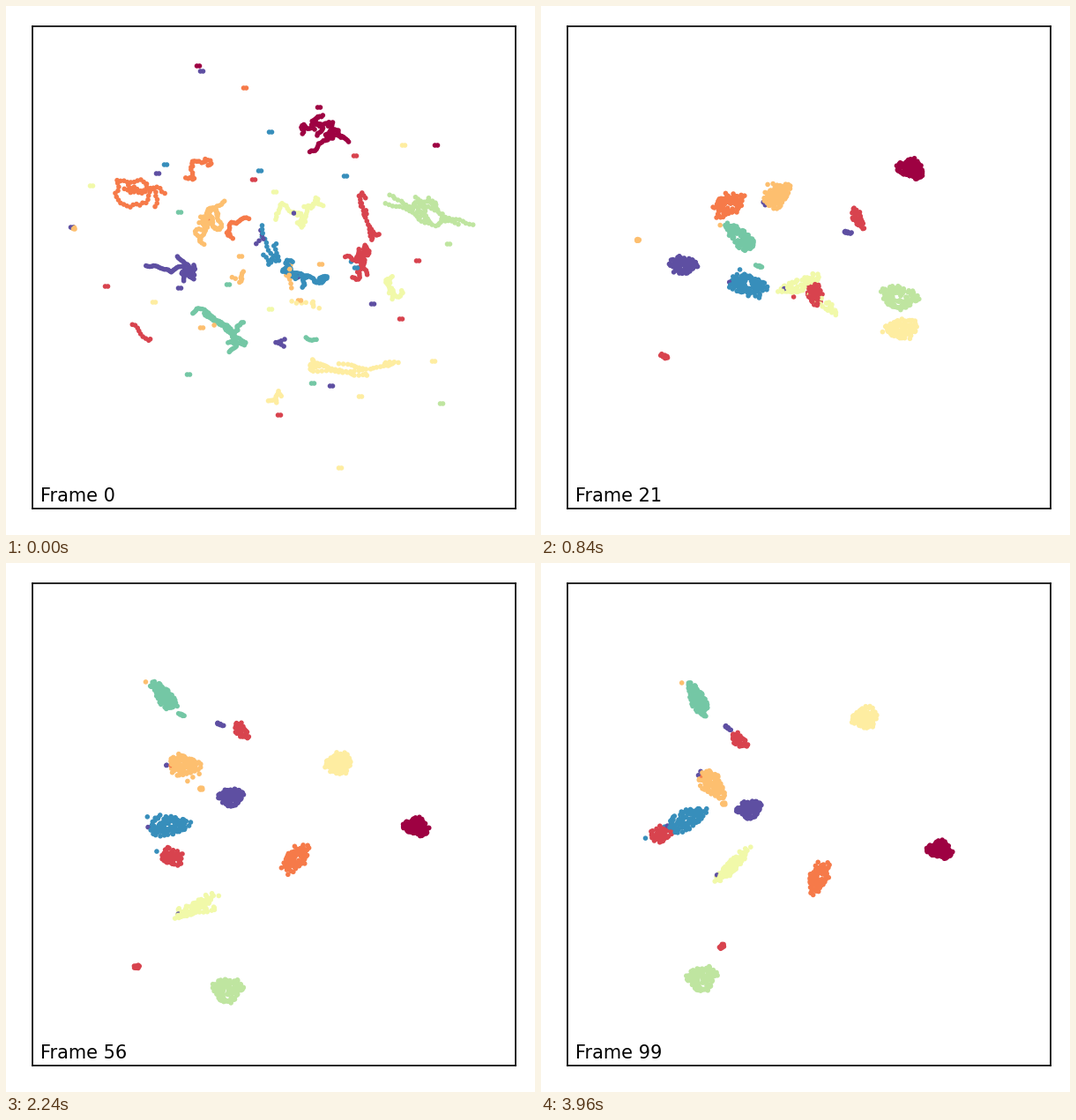
Recreate the animation shown at these times as a matplotlib script. Size 600 px wide and 600 px high, loop 4 s.

```python
import matplotlib.pyplot as plt
import numpy as np
from matplotlib.animation import FuncAnimation

FRAMES, INTERVAL = 100, 40
KEYS = np.array([0, 13, 30, 40, 56, 73, 99])
CENTER = np.array([304, 296])

rng = np.random.default_rng(11)
mains = {}
tracks, labels, pushes = [], [], []


def filaments(n):
    """Branching random walk, scaled to the unit box along its main axes."""
    pts, heading, here = [np.zeros(2)], rng.uniform(0, 6.28), 0
    while len(pts) < n:
        if rng.random() < 0.12:
            here, heading = rng.integers(len(pts)), rng.uniform(0, 6.28)
        heading += rng.normal(0, 0.6)
        pts.append(pts[here] + [np.cos(heading), np.sin(heading)])
        here = len(pts) - 1
    pts = np.array(pts) - np.mean(pts, axis=0)
    axes = np.linalg.eigh(pts.T @ pts)[1][:, ::-1]
    pts = pts @ axes
    pts -= (pts.max(axis=0) + pts.min(axis=0)) / 2
    return pts / np.maximum(np.abs(pts).max(axis=0), 1e-6)


def blob(walk):
    """Bumpy disc that keeps every point on its own side of the walk."""
    n = len(walk)
    rank = np.argsort(np.argsort(np.arctan2(walk[:, 1], walk[:, 0])))
    angle = 2 * np.pi * rank / n - np.pi
    radius = np.sqrt(rng.random(n)) * (1 + 0.15 * np.sin(3 * angle + rng.uniform(0, 6)))
    return np.column_stack([np.cos(angle), np.sin(angle)]) * radius[:, None]


def add(label, n, first, last, path, push=0.06):
    """Points that turn from filaments into a blob; shapes are (long, short, tilt)."""
    first, last = np.array(first), np.array(last)
    walk = filaments(n)
    disc = blob(walk)
    poses = []
    for key, center in zip(KEYS, path):
        mix = 1 - np.exp(-key / 12)
        size = first[:2] + (last - first)[:2] * mix
        tilt = np.radians(first[2] + (last - first)[2] * key / KEYS[-1])
        turn = np.array([[np.cos(tilt), np.sin(tilt)], [-np.sin(tilt), np.cos(tilt)]])
        poses.append(center + ((walk + (disc - walk) * mix) * size) @ turn)
    tracks.append(np.array(poses))
    labels.extend([label] * n)
    pushes.extend([push] * n)


def cluster(label, n, first, last, *path):
    path = np.array(path, float)
    mains.setdefault(label, (last, path, first))
    add(label, n, first, last, path)


def joiner(label, n, home, shape=(1.5, 0.5, 0), lag=4, push=0.06):
    """A loose piece that is pulled into the main cluster of its class."""
    last, path, _ = mains[label]
    pull = np.exp(-KEYS / lag)[:, None]
    add(label, n, shape, last, path + (home - path[0]) * pull, push)


def strays(label, *homes):
    for home in homes:
        joiner(label, 2, home, lag=rng.uniform(4, 8), push=0.2)


# main clusters
cluster(0, 130, (28, 22, 20), (14, 10, 10), (361, 148), (396, 163), (446, 216),
        (466, 259), (465, 299), (452, 322), (452, 325))
cluster(1, 60, (20, 14, 100), (13, 9, -25), (398, 290), (339, 318), (277, 335),
        (225, 334), (188, 333), (147, 326), (136, 307))
cluster(2, 62, (28, 16, 5), (19, 10, -65), (152, 213), (182, 200), (253, 263),
        (299, 308), (328, 335), (331, 349), (314, 357))
cluster(3, 95, (27, 13, -60), (18, 11, 50), (233, 244), (268, 222), (260, 212),
        (230, 221), (202, 230), (197, 245), (194, 251))
cluster(4, 75, (50, 9, 0), (15, 12, -10), (395, 410), (412, 405), (401, 313),
        (388, 260), (377, 227), (366, 203), (367, 175))
cluster(5, 60, (28, 16, -15), (27, 6, -45), (333, 235), (321, 275), (259, 363),
        (224, 392), (215, 390), (215, 370), (217, 343))
cluster(6, 110, (51, 14, 18), (17, 14, -10), (481, 233), (447, 280), (356, 391),
        (311, 450), (251, 484), (213, 497), (182, 471))
cluster(7, 95, (34, 18, 40), (19, 8, 65), (245, 362), (240, 316), (207, 199),
        (193, 159), (179, 151), (167, 153), (177, 154))
cluster(8, 75, (25, 12, 20), (24, 11, -25), (338, 307), (276, 308), (190, 322),
        (174, 306), (184, 298), (175, 296), (165, 291))
cluster(9, 85, (28, 13, 10), (14, 10, -10), (187, 296), (153, 301), (179, 281),
        (222, 272), (255, 265), (246, 280), (236, 279))

# small clusters that stay apart
cluster(1, 36, (27, 5, 72), (11, 6, 45), (411, 238), (374, 262), (343, 212),
        (310, 202), (267, 190), (236, 200), (225, 201))
cluster(1, 9, (13, 2, 45), (4, 2, -40), (153, 370), (130, 373), (153, 428),
        (151, 449), (148, 458), (137, 472), (205, 435))
cluster(9, 8, (5, 4, 0), (5, 1, 35), (311, 382), (362, 306), (320, 206),
        (287, 185), (243, 183), (214, 189), (212, 187))
cluster(7, 6, (6, 1, 10), (4, 1, 30), (346, 378), (239, 376), (265, 198),
        (230, 174), (199, 172), (184, 176), (184, 172))
cluster(3, 5, (1, 1, 0), (3, 2, 0), (77, 252), (103, 276), (123, 250),
        (178, 250), (221, 256), (220, 265), (207, 273))

# loose pieces
joiner(2, 24, (216, 183), (17, 8, -40))
joiner(2, 20, (262, 249), (15, 7, -45))
joiner(3, 9, (265, 307), (7, 5, -40))
joiner(3, 9, (321, 307), (13, 3, 85))
joiner(4, 14, (306, 445), (8, 4, -45))
joiner(4, 9, (340, 337), (16, 3, 10))
joiner(5, 26, (439, 320), (12, 7, 60), lag=15)
joiner(8, 25, (297, 270), (22, 9, 70))
joiner(9, 5, (289, 263), (8, 3, -70))

strays(0, (355, 115), (218, 68), (488, 158))
strays(1, (281, 197), (396, 170), (467, 289), (448, 355), (114, 318), (310, 464))
strays(2, (271, 93))
strays(3, (357, 293), (333, 334), (222, 365), (266, 284))
strays(4, (402, 443), (485, 403), (379, 524), (451, 158), (168, 336))
strays(5, (305, 211), (300, 344), (97, 204))
strays(6, (494, 451), (502, 270))
strays(7, (207, 418), (197, 234), (348, 428), (252, 316))
strays(8, (300, 143), (288, 187), (181, 180), (385, 193), (397, 297))
strays(9, (222, 74), (75, 251), (172, 190), (197, 320), (369, 431), (416, 338))

# single points that live inside another class
for label, host in ((9, 3), (9, 3), (9, 5), (9, 8), (8, 1), (3, 7), (2, 3)):
    last, path, first = mains[host]
    spot = blob(rng.normal(size=(1, 2)))[0]
    add(label, 1, first, last, path + spot * [8, 6])

order = rng.permutation(len(labels))
spots = np.concatenate(tracks, axis=1)[:, order]
push = np.array(pushes)[order][:, None]
colors = plt.cm.Spectral(np.array(labels)[order] / 9)
slopes = 0.6 * np.gradient(spots, KEYS, axis=0)


def positions(frame):
    k = min(np.searchsorted(KEYS, frame, side="right") - 1, len(KEYS) - 2)
    span = KEYS[k + 1] - KEYS[k]
    t = (frame - KEYS[k]) / span
    ease = t * t * (3 - 2 * t)
    xy = (spots[k] * (1 - ease) + spots[k + 1] * ease
          + span * t * (1 - t) * ((1 - t) * slopes[k] - t * slopes[k + 1]))
    # early repulsion flings loose points outwards
    burst = frame / 3 * np.exp(1 - frame / 3) * max(0, 1 - frame / 13)
    return xy + (xy - CENTER) * push * burst


fig = plt.figure(figsize=(6, 6), dpi=100, facecolor="white")
ax = fig.add_axes([30 / 600, 30 / 600, 548 / 600, 547 / 600])
ax.set(xlim=(30, 578), ylim=(570, 23), xticks=[], yticks=[])
for spine in ax.spines.values():
    spine.set_linewidth(1.2)
start = positions(0)
dots = ax.scatter(start[:, 0], start[:, 1], s=16, c=colors, linewidths=0)
caption = ax.text(39.2, 562, "Frame 0", fontsize=15, family="DejaVu Sans",
                  va="baseline")


def update(frame):
    dots.set_offsets(positions(frame))
    caption.set_text(f"Frame {frame}")
    return dots, caption


anim = FuncAnimation(fig, update, frames=FRAMES, interval=INTERVAL,
                     repeat=True, repeat_delay=0)
plt.show()
```
